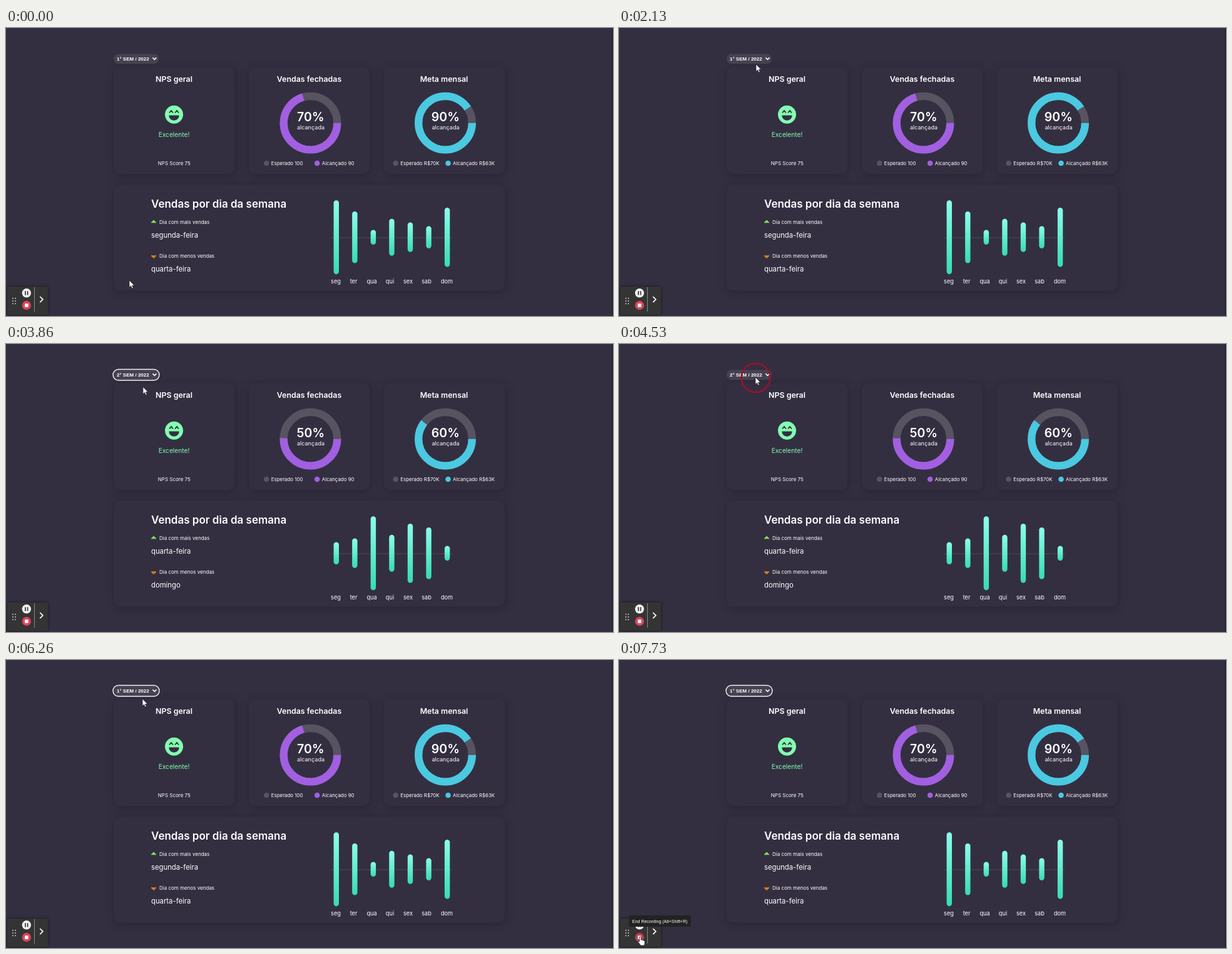
Write an HTML page that moves like this. It is 970 px wide and 460 px high and loops after 7800 ms.

```html
<!DOCTYPE html>
<html lang="pt">
<head>
<meta charset="utf-8">
<style>
html, body { margin: 0; width: 970px; height: 460px; overflow: hidden; background: #332f41; }
svg { display: block; }
text { font-family: Inter, sans-serif; font-optical-sizing: none; fill: #fff; white-space: pre; }
.mid { text-anchor: middle; }
.plain { font-family: "Liberation Sans", Arial, sans-serif; }
.card { fill: #332f41; filter: drop-shadow(1px 2px 7px rgba(18, 14, 28, .38)); }
</style>
</head>
<body>
<svg id="stage" width="970" height="460" viewBox="0 0 970 460">
  <defs>
    <linearGradient id="mint" x1="0" y1="0" x2="0" y2="1">
      <stop offset="0" stop-color="#8dfdec"/>
      <stop offset="1" stop-color="#36dcb1"/>
    </linearGradient>
  </defs>
  <rect x="968.5" width="1.5" height="460" fill="#24212e"/>
  <g id="board"></g>

  <g id="smile">
    <circle cx="268.5" cy="138.3" r="14.5" fill="#83fdb0"/>
    <path d="M261 135.5l3-3.6 3 3.6M270 135.5l3-3.6 3 3.6" fill="none" stroke="#332f41" stroke-width="1.7"/>
    <path d="M260.3 139.5h16.4a8.2 8.2 0 0 1-16.4 0z" fill="#332f41"/>
  </g>
  <path d="M236 307l-4 3.8h8z" fill="#7de35c" stroke="#7de35c" stroke-linejoin="round"/>
  <path d="M236 367.6l-4-3.8h8z" fill="#d9801f" stroke="#d9801f" stroke-linejoin="round"/>

  <rect x="172" y="41.5" width="72" height="15.5" rx="7.75" fill="#474252"/>
  <rect id="focus" x="171" y="40.5" width="74" height="17.5" rx="8.75" fill="none" stroke="#f4f4f6" stroke-width="1.4"/>
  <text id="term" class="plain" x="177" y="52" font-size="8" font-weight="700"></text>
  <path d="M234.4 47.4l3 3 3-3" fill="none" stroke="#fff" stroke-width="1.5"/>

  <g id="recorder">
    <rect x="2" y="413" width="65" height="45" rx="2" fill="#343434" style="filter:drop-shadow(0 0 2px #0008)"/>
    <path d="M11 431.7h0M15 431.7h0M11 436h0M15 436h0M11 440.3h0M15 440.3h0" stroke="#c9c9c9" stroke-width="2" stroke-linecap="round"/>
    <path d="M45.5 414v39" stroke="#8a8a8a"/>
    <path d="M54.3 429l4.6 4.6-4.6 4.6" fill="none" stroke="#fff" stroke-width="1.7"/>
    <circle cx="32.8" cy="423.3" r="7.2" fill="#f1f1f1"/>
    <path d="M31 420.2v6.2M34.6 420.2v6.2" stroke="#343434" stroke-width="1.7"/>
    <circle id="stop" cx="32.8" cy="443" r="7.2" fill="#dc4459"/>
    <rect x="30" y="440.2" width="5.6" height="5.6" rx=".6" fill="#fff"/>
  </g>
  <g id="tip">
    <rect x="16" y="408" width="99" height="18" rx="2" fill="#222"/>
    <text class="plain" x="21" y="419.5" font-size="7">End Recording (Alt+Shift+R)</text>
  </g>

  <circle id="ring" r="23" fill="none" stroke="#a01028" stroke-width="2.5"/>
  <path id="arrow" d="M0 0v11.4l2.6-2.4 1.8 4.1 1.9-.8-1.8-4h3.5z" fill="#fff" stroke="#1c1a24" stroke-width=".7"/>
  <path id="hand" d="M-1.4 1a1.3 1.3 0 0 1 2.6 0v4l1-.3q1 0 1.2.8 1.7-.4 2 .7 1.8-.2 1.8 1.3v3q0 1.6-1.2 3.5h-5.4q-1.4-2.7-4-5.3-.5-1.4 1-1.5l1 .9z" fill="#fff" stroke="#1c1a24" stroke-width=".8"/>
</svg>
<script>
const LOOP = 7800, MOVE = 680, FIRST = 2930, SECOND = 5460;
const $ = id => document.getElementById(id);
const board = $('board');

function add(tag, attrs, label) {
  const el = document.createElementNS('http://www.w3.org/2000/svg', tag);
  for (const key in attrs) el.setAttribute(key, attrs[key]);
  if (label) el.textContent = label;
  return board.appendChild(el);
}
const text = (x, y, size, label, more) => add('text', { x, y, 'font-size': size, ...more }, label);
const centred = (x, y, size, label, more) => text(x, y, size, label, { class: 'mid', ...more });
const card = (x, y, width, height) => add('rect', { x, y, width, height, rx: 10, class: 'card' });
const bold = { 'font-weight': 600 };

// Cards
for (const x of [172, 388, 603.5]) card(x, 62.5, 193.5, 170.5);
card(172, 250, 625, 169.5);
centred(268.5, 85.7, 12.4, 'NPS geral', bold);
centred(268.5, 173.7, 10.2, 'Excelente!', { style: 'fill:#83fdb0' });
centred(268.8, 219, 8, 'NPS Score 75');

// Donuts: share of the ring before and after the switch
const RADIUS = 42.8, ROUND = 2 * Math.PI * RADIUS, GREY = '#575361';
function donut(cx, title, color, shares, legend) {
  centred(cx - 2, 85.7, 12.4, title, bold);
  const ring = stroke => add('circle', { cx, cy: 151.7, r: RADIUS, fill: 'none', stroke, 'stroke-width': 12.2 });
  ring(GREY);
  const arc = ring(color);
  const label = centred(cx + .3, 149.2, 19.5, '', bold);
  centred(cx + .5, 162.3, 9.1, 'alcançada');
  legend.forEach(([x, name], i) => {
    add('circle', { cx: x, cy: 216, r: 4.3, fill: i ? color : GREY });
    text(x + 7.6, 219, 7.9, name);
  });
  return { arc, label, shares };
}
const donuts = [
  donut(486.5, 'Vendas fechadas', '#a25fe1', [70, 50], [[416.2, 'Esperado 100'], [497.2, 'Alcançado 90']]),
  donut(702, 'Meta mensal', '#4ac9e1', [90, 60], [[622.7, 'Esperado R$70K'], [706.5, 'Alcançado R$63K']])
];

// Week
text(232, 286.6, 17, 'Vendas por dia da semana', bold);
text(245, 313.4, 8, 'Dia com mais vendas');
text(245, 367.4, 8, 'Dia com menos vendas');
const best = text(232, 335, 11.3), worst = text(232, 389, 11.3);
add('path', { d: 'M520 335h193', stroke: '#4e4a5b' });
const bars = [
  ['seg', 527, 100, 30], ['ter', 555.5, 70, 40], ['qua', 584.5, 20, 100], ['qui', 613.5, 50, 50],
  ['sex', 642.5, 40, 80], ['sab', 672, 30, 70], ['dom', 704.5, 80, 20]
].map(([day, x, ...sizes], i) => {
  centred(x, 408.3, 9.2, day);
  return { sizes, el: add('rect', { x: 523.6 + i * 29.55, width: 8.4, rx: 4.2, fill: 'url(#mint)' }) };
});

// Pointer path: time, x, y
const path = [
  [0, 197, 403], [60, 197, 401], [460, 196, 2], [600, 190, 14], [730, 192, 38], [950, 206, 49],
  [1250, 218, 52], [1660, 219, 57], [2060, 219, 57], [2130, 219, 58], [2929, 219, 58],
  [2930, 219, 74], [3260, 219, 71], [3800, 219, 70], [4460, 218, 53], [5459, 218, 53],
  [5460, 218, 62], [6700, 218, 62], [7100, 120, 260], [7460, 38, 437], [7600, 34, 442], [LOOP, 34, 442]
];
const clicks = [1270, 4530];

const mix = (a, b, p) => a + (b - a) * p;
const clamp = v => Math.min(1, Math.max(0, v));
const show = (id, on) => $(id).setAttribute('opacity', +on);
const place = (id, x, y) => $(id).setAttribute('transform', `translate(${x} ${y})`);

// cubic-bezier(.25, .1, .25, 1)
function ease(x) {
  const curve = (u, a, b) => 3 * u * (1 - u) ** 2 * a + 3 * u * u * (1 - u) * b + u ** 3;
  let low = 0, high = 1;
  for (let i = 0; i < 20; i++) {
    const u = (low + high) / 2;
    if (curve(u, .25, .25) < x) low = u; else high = u;
  }
  return curve(low, .1, 1);
}

function pointer(t) {
  const i = path.findIndex(p => p[0] > t), [t0, x0, y0] = path[i - 1], [t1, x1, y1] = path[i];
  const p = (t - t0) / (t1 - t0);
  return [mix(x0, x1, p), mix(y0, y1, p)];
}

function draw(t) {
  const second = t >= FIRST && t < SECOND ? 1 : 0;
  const p = ease(clamp((t - FIRST) / MOVE)) - ease(clamp((t - SECOND) / MOVE));
  $('term').textContent = `${second + 1}° SEM / 2022`;
  best.textContent = ['segunda-feira', 'quarta-feira'][second];
  worst.textContent = ['quarta-feira', 'domingo'][second];
  for (const { arc, label, shares } of donuts) {
    label.textContent = shares[second] + '%';
    arc.setAttribute('stroke-dasharray', `${mix(...shares, p) * 1.0075 / 100 * ROUND} ${ROUND}`);
  }
  for (const { el, sizes } of bars) {
    const height = mix(...sizes, p) * 1.18;
    el.setAttribute('height', height);
    el.setAttribute('y', 334.2 - height / 2);
  }

  const [x, y] = pointer(t), over = t >= 7530;
  place('arrow', x, y);
  place('hand', x, y);
  show('arrow', !over);
  show('hand', over);
  show('tip', t >= 7600);
  $('stop').setAttribute('fill', over ? '#c23a4d' : '#dc4459');
  show('focus', t >= FIRST && t < clicks[1] || t >= SECOND);

  const click = clicks.find(c => t >= c && t < c + 270);
  show('ring', click ? clamp((click + 270 - t) / 190) : 0);
  place('ring', x + .5, y + 1);
}

const start = performance.now();
function tick() {
  draw((performance.now() - start) % LOOP);
  requestAnimationFrame(tick);
}
tick();
</script>
</body>
</html>
```
